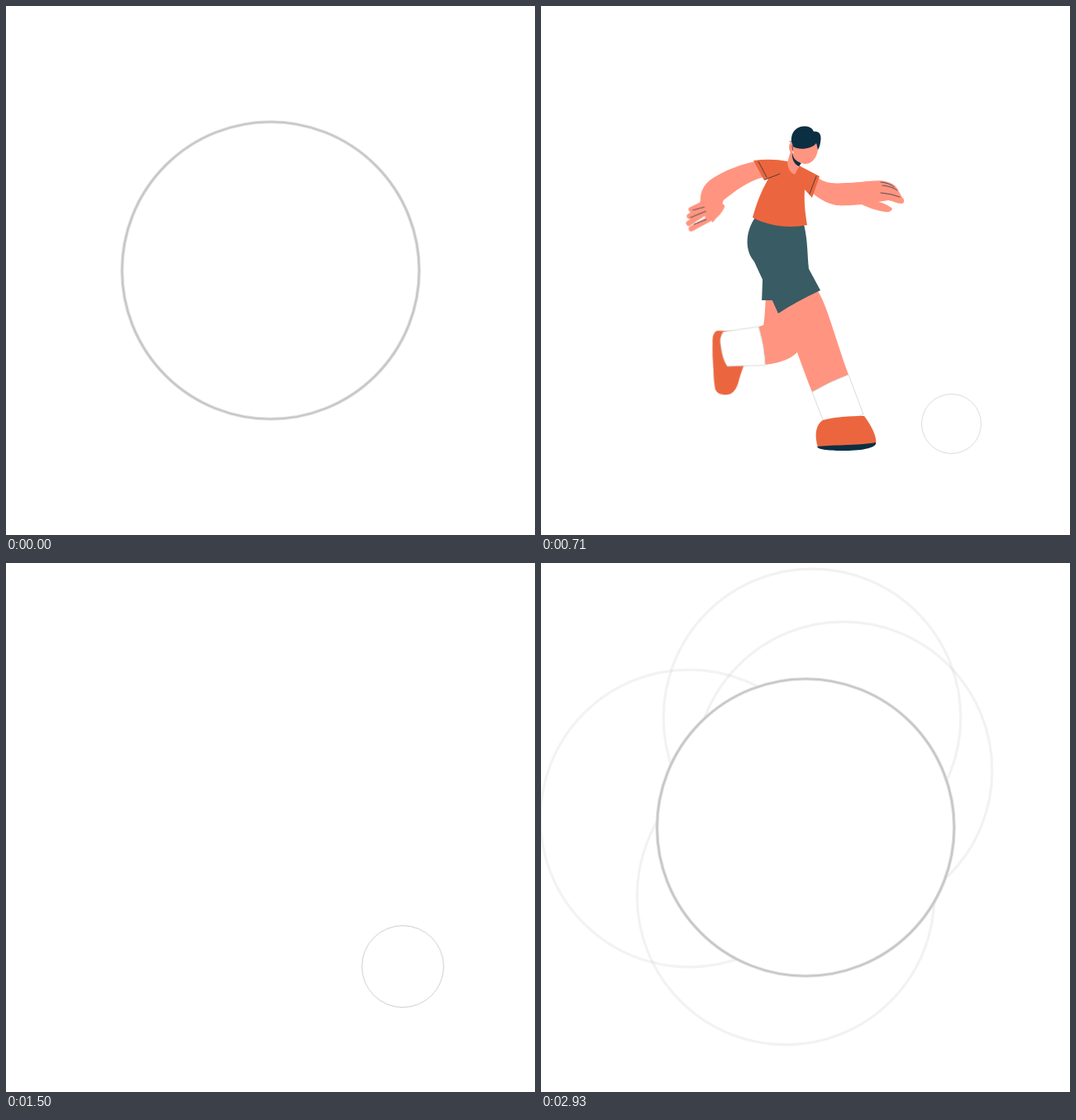
Recreate the animation shown at these times as an HTML page. Size 640 by 640 pixels, loop 3000 ms.

```html
<!DOCTYPE html>
<html lang="en">
<head>
<meta charset="utf-8">
<title>Kick</title>
<style>
html, body { margin: 0; width: 100%; height: 100%; overflow: hidden; background: #fff; }
svg { display: block; width: 100vw; height: 100vh; }

.skin { fill: #ff9580; }
.shirt { fill: #eb663e; }
.shorts { fill: #395b64; }
.dark { fill: #0b2f42; }
.white, .ball { fill: #fff; stroke: #c6c6c6; stroke-width: .64; }
.line { fill: none; stroke: #0b2f42; stroke-width: .7; stroke-linecap: round; }
.fingers { fill: none; stroke: #ff9580; stroke-width: 6.4; stroke-linecap: round; }
.burst circle { fill: none; stroke: #c6c6c6; stroke-width: 3.2; opacity: 0; animation-name: burst; }

svg * { animation: 3s linear infinite; }
.cam { animation-name: cam; transform-origin: 540.6px 551.9px; }
.player { animation-name: show; animation-timing-function: step-end; }
.run { animation-name: run; }
.thigh { animation-name: thigh; }
.backshorts { animation-name: backshorts; }
.shin { animation-name: shin; }
.backsock { animation-name: backsock; }
.backshoe { animation-name: backshoe; }
.frontleg { animation-name: frontleg; }
.frontshorts { animation-name: frontshorts; }
.frontshin { animation-name: frontshin; }
.frontshoe { animation-name: frontshoe; }
.sole { animation-name: sole; }
.larm { animation-name: larm; }
.lhand { animation-name: lhand; }
.lsleeve { animation-name: lsleeve; }
.lcuff { animation-name: lcuff; }
.rarm { animation-name: rarm; }
.rhand { animation-name: rhand; }
.rsleeve { animation-name: rsleeve; }
.rcuff { animation-name: rcuff; }

@keyframes cam {
  0% { transform: scale(5); animation-timing-function: cubic-bezier(.333, 0, .667, 1); }
  13.57%, 47.5% { transform: scale(1); animation-timing-function: cubic-bezier(.333, 0, .667, 1); }
  60.9%, 100% { transform: scale(5); }
}
@keyframes show {
  0% { visibility: visible; }
  46.7%, 100% { visibility: hidden; }
}
@keyframes run {
  0% { transform: translate(-29px, -6px); }
  9.67% { transform: translate(-14.8px, -3.4px); }
  18.9%, 100% { transform: none; }
}
@keyframes burst {
  0%, 74% { opacity: 0; transform: translate(var(--a), var(--b)); }
  76.2% { opacity: .19; transform: translate(var(--a), var(--b)); }
  97.67%, 99.9% { opacity: .22; transform: translate(var(--c), var(--d)); }
  100% { opacity: 0; transform: translate(var(--c), var(--d)); }
}

/* kicking leg */
@keyframes thigh {
  0%, 9.67% { d: path("M278 350C278 362 279 375 279 385L257 389Q264 412 266 437C292 434 322 426 329 407L335 350Z"); }
  21.3%, 23.67% { d: path("M272 350C271 362 271 375 269 386L263 388Q270 411 271 434C290 432 312 426 318 405L322 350Z"); }
  33.33% { d: path("M300 350C305 365 312 380 317 392L319 396Q338 412 361 416C372 400 368 372 356 352L345 335Z"); }
  40.33%, 100% { d: path("M340 350C357 374 375 395 390 411L396 416Q422 414 431 386C422 372 414 352 402 338L380 318Z"); }
}
@keyframes backshorts {
  0%, 9.67% { d: path("M318 266C320 280 322 300 322 320L320 356L274 357L272 323L258 305Z"); }
  21.3%, 23.67% { d: path("M318 266C320 280 318 300 312 320L306 356L267 356L268 331L256 305Z"); }
  40.33%, 100% { d: path("M321 265C332 266 339 276 346 283L384 320L343 360L320 335L262 300Z"); }
}
@keyframes shin {
  0%, 9.67% { transform: translate(261px, 413px) rotate(175deg); }
  21.3%, 23.67% { transform: translate(267px, 411px) rotate(175deg); }
  33.33% { transform: translate(340px, 406px) rotate(115.5deg); }
  40.33%, 100% { transform: translate(414px, 401px) rotate(56deg); }
}
@keyframes backsock {
  0%, 23.67% { d: path("M2 23.3Q-3 0 -2 -24L44 -21Q49 -12 49.5 4Q51 14 45 21Z"); }
  40.33%, 100% { d: path("M2.4 23.3Q14 0 -2.9 -22.5L47 -19Q54 -8 54.5 4Q54 15 43.4 23.3Z"); }
}
@keyframes backshoe {
  0%, 23.67% { d: path("M27 21Q46 22 52 23Q58 22 59 11Q61 -6 61 -24Q62 -37 61 -47Q59 -54 51 -55Q44 -56 40 -53Q34 -48 31 -38Q28 -30 24 -22Z"); }
  40.33%, 100% { d: path("M27 24Q32 28 39 30Q47 31 54 29Q62 24 68 15Q75 4 77 -6Q75 -14 66 -22Q61 -27 55 -29Q48 -31 40 -29Q32 -27 24 -23Z"); }
}

/* standing leg */
@keyframes frontleg {
  0%, 9.67% { d: path("M310 330L345 333C364 357 366 369 390 436L346 457C331 418 320 390 304 366Z"); }
  18.9%, 100% { d: path("M300 330L335 345C346 362 356 402 372 446L328 467C312 427 302 392 288 368Z"); }
}
@keyframes frontshorts {
  0%, 9.67% { d: path("M259 256C246 275 247 298 259 310L304 368Q324 348 349 331L327 303C326 290 322 280 319 264Z"); }
  18.9%, 100% { d: path("M259 256C246 275 247 298 259 310L287 372Q308 358 338 344L324 318C322 300 323 285 318 264Z"); }
}
@keyframes frontshin {
  0%, 9.67% { transform: translate(18px, -10px); }
  18.9%, 100% { transform: none; }
}
@keyframes frontshoe {
  0%, 9.67% { d: path("M345 510C349 519 352 530 355 538L431 501C431 498 428 494 424 493C412 491 400 490 388 488C374 494 358 501 345 510Z"); }
  18.9%, 100% { d: path("M341 501C333 506 330 518 335 534L405 530C407 522 400 508 391 496C375 496 355 497 341 501Z"); }
}
@keyframes sole {
  0%, 9.67% { d: path("M355 536C358 522 400 496 429 500C437 508 390 537 362 539C357 540 355 538 355 536Z"); }
  18.9%, 100% { d: path("M334 533C345 531 385 532 405 528C407 534 390 538 368 538C350 538 335 537 334 533Z"); }
}

/* arms */
@keyframes larm {
  0%, 9.67% { d: path("M260 188C236 195 216 215 220 230Q226 250 232 268L254 264Q248 250 242 234C246 224 258 216 270 208Z"); }
  23.67% { d: path("M260 188C238 192 210 204 200 215Q192 224 193 238L208 262Q214 256 221 235C235 224 250 212 269 207Z"); }
  29.67% { d: path("M259 184C240 184 200 194 178 207Q166 211 158 216L168 240Q178 236 186 230C215 218 240 208 268 204Z"); }
  40.33%, 100% { d: path("M262 179C240 176 215 176 199 180Q190 183 184 190L184 218Q195 217 204 211C220 206 245 203 268 200Z"); }
}
@keyframes lhand {
  0%, 9.67% { transform: translate(246px, 271px) rotate(-112deg); }
  23.67% { transform: translate(208px, 240px) rotate(-40deg); }
  29.67% { transform: translate(162px, 225px) rotate(-20deg); }
  40.33%, 100% { transform: translate(190px, 203px) rotate(0deg); }
}
@keyframes lsleeve {
  0%, 23.67% { d: path("M257 187Q278 184 299 188L289 203L270 211Z"); }
  40.33%, 100% { d: path("M259 178Q280 181 299 188L288 202L267 204Z"); }
}
@keyframes lcuff {
  0%, 23.67% { d: path("M263 188L273 207M271 210L289 203"); }
  40.33%, 100% { d: path("M265 180L270 203M268 204L287 202"); }
}
@keyframes rarm {
  0%, 9.67% { d: path("M332 208C343 224 356 226 372 226C384 227 388 228 394 230L376 252C368 249 360 248 354 246C344 242 332 236 324 228Z"); }
  23.67% { d: path("M332 206C345 215 352 215 368 214C382 214 390 212 398 212L390 240C375 241 366 242 357 241C346 239 336 233 328 226Z"); }
  29.67% { d: path("M331 207C345 216 355 220 372 220C388 219 398 218 408 218L400 246C384 246 372 247 360 244C346 240 334 234 326 228Z"); }
  40.33%, 100% { d: path("M330 211C343 228 362 232 378 239C386 243 388 246 392 249L369 266C362 263 354 261 350 258C338 252 326 244 319 232Z"); }
}
@keyframes rhand {
  0%, 9.67% { transform: translate(385px, 242px) rotate(28deg); }
  23.67% { transform: translate(396px, 226px) rotate(0deg); }
  29.67% { transform: translate(406px, 232px) rotate(4deg); }
  40.33%, 100% { transform: translate(380px, 256px) rotate(47deg); }
}
@keyframes rsleeve {
  0%, 23.67% { d: path("M312 193L337 206L328 232L318 221Z"); }
  40.33%, 100% { d: path("M312 193L334 213L320 235L317 222Z"); }
}
@keyframes rcuff {
  0%, 23.67% { d: path("M333 206L325 227"); }
  40.33%, 100% { d: path("M330 211L318 228"); }
}
</style>
</head>
<body>
<svg viewBox="0 0 640 640">
  <g class="burst">
    <circle cx="320" cy="320" r="179.8" style="--a:-24px;--b:-27px;--c:8px;--d:-133px"/>
    <circle cx="320" cy="320" r="179.8" style="--a:19px;--b:-2px;--c:46px;--d:-69px"/>
    <circle cx="320" cy="320" r="179.8" style="--a:-40px;--b:16px;--c:-141px;--d:-11px"/>
    <circle cx="320" cy="320" r="179.8" style="--a:23px;--b:104px;--c:-24px;--d:83px"/>
  </g>
  <g class="cam">
    <g class="player"><g class="run">
      <path class="skin thigh"/>
      <path class="shorts backshorts"/>
      <g class="shin">
        <path class="shirt backshoe"/>
        <path class="white backsock"/>
      </g>

      <path class="skin frontleg"/>
      <g class="frontshin">
        <path class="white" d="M328 467Q350 454 372 446L390 494L345 511Z"/>
        <path class="shirt frontshoe"/>
        <path class="dark sole"/>
      </g>
      <path class="shorts frontshorts"/>

      <path class="skin larm"/>
      <g class="lhand">
        <path class="skin" d="M8 -21C-3 -19 -7 -12 -14 -10L-18 13C-10 17 2 16 10 11Z"/>
        <path class="fingers" d="M-8 -8L-24 -12M-10 -4L-31 -7M-10 2L-37 -1M-14 11L-39 6"/>
        <path class="line" d="M-23 -10L-10 -4M-31 -5L-12 1M-33 4L-18 9"/>
      </g>
      <path class="skin rarm"/>
      <g class="rhand">
        <path class="skin" d="M0 -14C10 -15 22 -16 32 -9C36 -5 38 2 43 8Q44 13 40 13C34 13 28 9 24 9L12 11C18 12 26 16 29 19Q28 24 20 23C8 21 0 18 -8 14Z"/>
        <path class="line" d="M15 -13Q26 -12 31 -7M17 -9Q28 -8 35 -3M15 0Q28 1 38 5"/>
      </g>

      <path class="shirt" d="M276 190L299 188L306 203L313 193L322 210L319 222C318 240 320 252 322 265C300 269 278 267 256 256C261 238 266 225 275 209Z"/>
      <path class="shirt lsleeve"/>
      <path class="line lcuff"/>
      <path class="shirt rsleeve"/>
      <path class="line rcuff"/>

      <path class="skin" d="M302 176L298 189Q299 201 307 204L313 192L314 184Z"/>
      <path class="dark" d="M304 176C304 183 308 188 315 190L312 194C306 191 303 185 304 176Z"/>
      <path class="skin" d="M304 166L335 165C337 180 329 191 320 191C311 191 304 182 304 166Z"/>
      <ellipse class="skin" cx="303" cy="171" rx="3" ry="6"/>
      <path class="line" d="M301 164L304 164M304 169L304.5 174"/>
      <path class="dark" d="M303 164C302 150 312 145 320 145.5C326 146 329 149 330 152C336 151 339 155 338.5 161C338 167 337 171 335 174C334 171 334 168 333 166C328 173 312 175 305 170Z"/>
    </g></g>
  </g>
  <g class="cam"><circle class="ball" cx="496.5" cy="505.5" r="35.95"/></g>
</svg>
</body>
</html>
```
